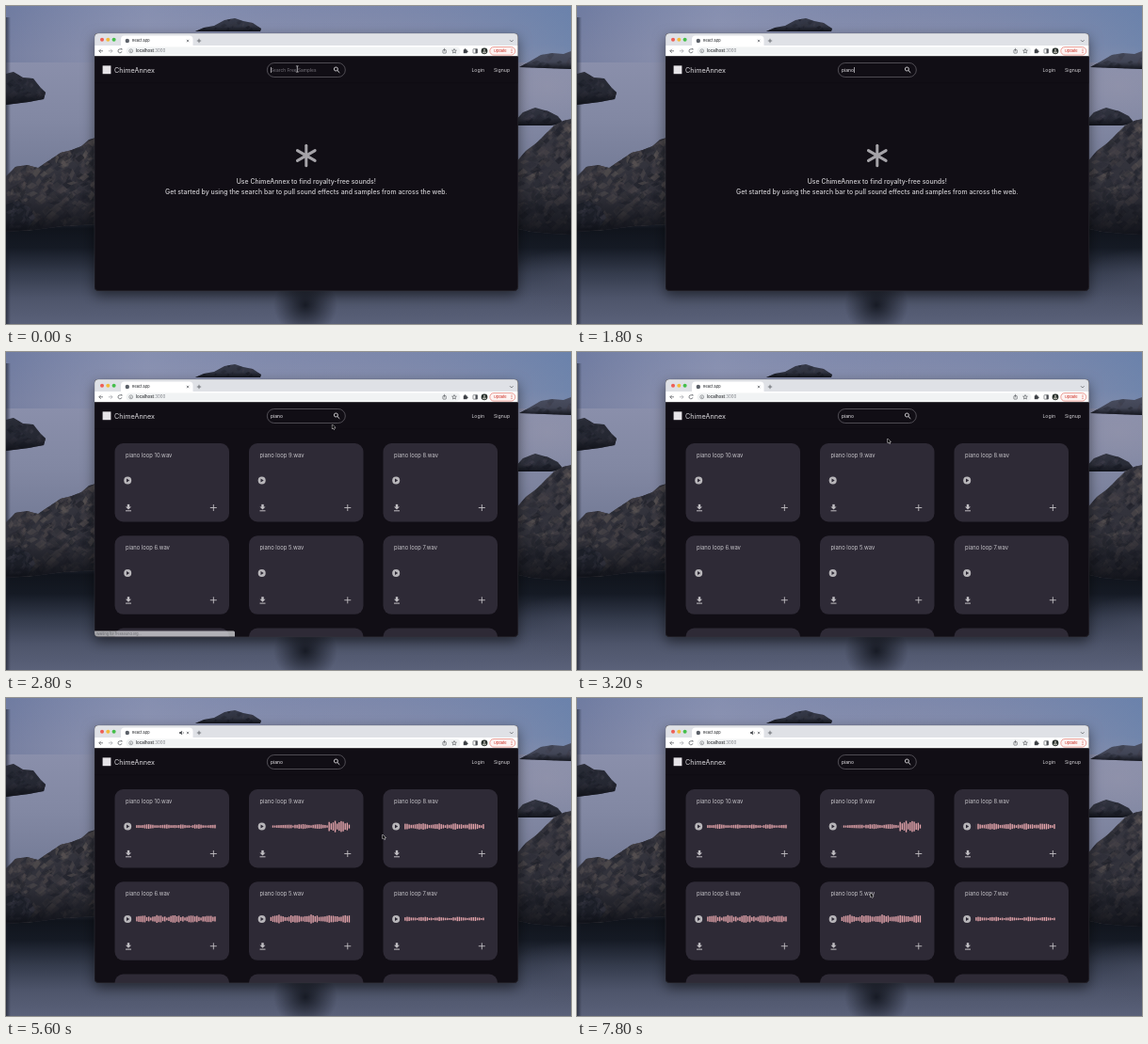
An HTML page with a canvas that plays this animation: 600 px wide and 338 px high, repeating every 8 s.

```html
<!DOCTYPE html>
<html lang="en">
<head>
<meta charset="utf-8">
<title>Sample search</title>
<style>
  html, body { margin: 0; width: 100%; height: 100%; overflow: hidden; background: #4a5263; }
  canvas { display: block; width: 100vw; height: 100vh; }
</style>
</head>
<body>
<canvas id="stage"></canvas>
<script>
const W = 600, H = 338, LOOP = 8000, STEP = 200;
const FONT = 'Inter, "Open Sans", sans-serif';
const canvas = document.getElementById('stage');
const scale = Math.max(1, window.devicePixelRatio || 1);
canvas.width = W * scale;
canvas.height = H * scale;
let ctx = canvas.getContext('2d');

function seeded(seed) {
  let s = seed;
  return () => (s = (s * 16807) % 2147483647) / 2147483647;
}

function text(str, x, y, size, color, weight = 400, align = 'left') {
  ctx.font = `${weight} ${size}px ${FONT}`;
  ctx.textAlign = align;
  ctx.fillStyle = color;
  ctx.fillText(str, x, y);
}

function rect(x, y, w, h, color) {
  ctx.fillStyle = color;
  ctx.fillRect(x, y, w, h);
}

function roundPath(x, y, w, h, r) {
  ctx.beginPath();
  ctx.roundRect(x, y, w, h, r);
}

function pill(x, y, w, h, r, fill, stroke, lw = 0.7) {
  roundPath(x, y, w, h, r);
  if (fill) { ctx.fillStyle = fill; ctx.fill(); }
  if (stroke) { ctx.strokeStyle = stroke; ctx.lineWidth = lw; ctx.stroke(); }
}

function dot(x, y, r, color) {
  ctx.beginPath();
  ctx.arc(x, y, r, 0, Math.PI * 2);
  ctx.fillStyle = color;
  ctx.fill();
}

function ring(x, y, r, color, lw, from = 0, to = Math.PI * 2) {
  ctx.beginPath();
  ctx.arc(x, y, r, from, to);
  ctx.strokeStyle = color;
  ctx.lineWidth = lw;
  ctx.stroke();
}

// Points are a flat list: x0, y0, x1, y1, ...
function trace(pts, close) {
  ctx.beginPath();
  for (let i = 0; i < pts.length; i += 2) ctx.lineTo(pts[i], pts[i + 1]);
  if (close) ctx.closePath();
}

function line(pts, color, lw) {
  trace(pts);
  ctx.strokeStyle = color;
  ctx.lineWidth = lw;
  ctx.stroke();
}

function shape(pts, color) {
  trace(pts, true);
  ctx.fillStyle = color;
  ctx.fill();
}

function gradient(x0, y0, x1, y1, stops) {
  const g = ctx.createLinearGradient(x0, y0, x1, y1);
  for (const [at, color] of stops) g.addColorStop(at, color);
  return g;
}

// ---- Wallpaper ----
function rock(pts, base, tones, count, seed, size) {
  const rnd = seeded(seed);
  const xs = pts.filter((_, i) => i % 2 === 0), ys = pts.filter((_, i) => i % 2);
  const left = Math.min(...xs), top = Math.min(...ys);
  const w = Math.max(...xs) - left, h = Math.max(...ys) - top;
  ctx.save();
  shape(pts, base);
  ctx.clip();
  for (let i = 0; i < count; i++) {
    const x = left + rnd() * w, y = top + rnd() * h;
    const a = size * (0.4 + rnd()), b = size * (0.2 + rnd() * 0.5);
    ctx.globalAlpha = 0.2 + rnd() * 0.4;
    shape([x, y, x + a * 0.6, y - b, x + a, y - b * 0.3, x + a * 0.4, y + b * 0.8],
      tones[Math.floor(rnd() * tones.length)]);
  }
  ctx.globalAlpha = 1;
  rect(left, top, w, h, gradient(0, top, 0, top + h,
    [[0, 'rgba(14,16,23,0)'], [0.6, 'rgba(14,16,23,.15)'], [1, 'rgba(14,16,23,.9)']]));
  ctx.restore();
}

function mist(x, y, rx, ry, color, alpha = 0.5) {
  ctx.save();
  ctx.translate(x, y);
  ctx.scale(rx, ry);
  const g = ctx.createRadialGradient(0, 0, 0, 0, 0, 1);
  g.addColorStop(0, `rgba(${color},${alpha})`);
  g.addColorStop(1, `rgba(${color},0)`);
  ctx.fillStyle = g;
  ctx.fillRect(-1, -1, 2, 2);
  ctx.restore();
}

function wallpaper() {
  rect(0, 0, W, H, gradient(0, 0, 0, H, [
    [0, '#7d88ab'], [0.15, '#8b90ac'], [0.36, '#8288a3'], [0.52, '#757c97'],
    [0.66, '#2b303d'], [0.7, '#10141c'], [0.76, '#151a24'], [0.84, '#343b4c'],
    [0.92, '#4e556b'], [1, '#5a6179']]));
  rect(0, 0, W, 60, gradient(0, 0, W, 0, [
    [0, 'rgba(94,108,148,.45)'], [0.25, 'rgba(150,156,186,.35)'],
    [0.6, 'rgba(125,135,172,.1)'], [1, 'rgba(88,124,172,.5)']]));
  mist(575, 85, 70, 45, '150,150,172');
  mist(600, 292, 70, 34, '78,84,106');
  mist(318, 318, 34, 32, '14,17,25', 0.85);
  rect(0, 12, 5, H - 12, gradient(0, 0, 5, 0, [[0, 'rgba(20,24,36,.6)'], [1, 'rgba(20,24,36,0)']]));

  const dark = ['#1b1e28', '#2a2c37', '#383843', '#454350'];
  const warm = ['#1d1f28', '#2f2f38', '#423f46', '#544e50', '#655d5b', '#262831'];
  rock([201, 27, 210, 23, 221, 21, 232, 15, 243, 13, 252, 16, 262, 18, 271, 24, 270, 27], '#363a49', dark, 40, 17, 6);
  rock([545, 65, 556, 59, 568, 52, 580, 50, 592, 51, 600, 48, 600, 67], '#4a4e60', dark, 30, 29, 7);
  rock([0, 72, 8, 70, 18, 76, 29, 77, 36, 86, 42, 92, 40, 99, 24, 102, 0, 105], '#292c37', dark, 80, 43, 8);
  rock([540, 123, 549, 113, 562, 108, 576, 112, 586, 117, 592, 125, 578, 127, 540, 127], '#30333f', dark, 50, 71, 8);
  rock([0, 181, 10, 171, 22, 169, 34, 172, 46, 164, 58, 156, 70, 153, 80, 149, 88, 142, 96, 140,
    96, 232, 60, 234, 30, 238, 0, 240], '#36363f', warm, 520, 97, 10);
  rock([540, 168, 552, 154, 564, 145, 573, 136, 582, 127, 592, 122, 600, 120, 600, 243,
    580, 242, 558, 240, 540, 236], '#373740', warm, 380, 131, 10);
  rock([0, 211, 12, 207, 25, 214, 31, 225, 22, 238, 0, 238], '#1d2029', dark, 60, 151, 8);
}

// ---- Browser window ----
function chrome(audible) {
  rect(94, 29, 450, 13, '#dfe1e6');
  dot(102, 35.8, 2, '#ee5f56');
  dot(108.3, 35.8, 2, '#f2bc3c');
  dot(114.6, 35.8, 2, '#45bf4b');
  pill(122, 31.5, 76.5, 13, [4, 4, 0, 0], '#fff');
  dot(128.8, 37, 2.2, '#5b6068');
  text('React App', 134, 38.4, 3.8, '#34363a', 500);
  line([191.8, 35.8, 194.2, 38.2], '#44474c', 0.6);
  line([194.2, 35.8, 191.8, 38.2], '#44474c', 0.6);
  line([202.8, 37, 207.2, 37], '#4b4e54', 0.7);
  line([205, 34.8, 205, 39.2], '#4b4e54', 0.7);
  line([535, 36.2, 536.8, 38, 538.6, 36.2], '#55585e', 0.7);
  if (audible) {
    shape([184, 36.2, 185.2, 36.2, 186.8, 34.8, 186.8, 39.2, 185.2, 37.8, 184, 37.8], '#3c3f44');
    ring(186.8, 37, 1.6, '#3c3f44', 0.5, -0.9, 0.9);
  }

  rect(94, 42, 450, 12, '#fff');
  const ink = '#4c4f55';
  line([103, 47.8, 98.8, 47.8], ink, 0.7);
  line([100.8, 45.8, 98.8, 47.8, 100.8, 49.8], ink, 0.7);
  line([108.8, 47.8, 113, 47.8], '#a0a3a8', 0.7);
  line([111, 45.8, 113, 47.8, 111, 49.8], '#a0a3a8', 0.7);
  ring(121, 47.8, 2, ink, 0.7, 0.2, 5.3);
  shape([121.5, 45.2, 123.3, 45.2, 123.3, 47.1], ink);
  pill(127.5, 43.4, 355, 9, 4.5, '#f1f3f4');
  ring(132.7, 47.8, 1.9, '#676a70', 0.6);
  line([132.7, 47.3, 132.7, 49], '#676a70', 0.6);
  text('localhost', 138, 49.4, 4.4, '#26282c', 500);
  const w = ctx.measureText('localhost').width;
  text(':3000', 138 + w, 49.4, 4.4, '#777a80');

  pill(463.9, 46.6, 3.4, 3.5, 0.5, null, ink, 0.6);
  line([465.6, 48.4, 465.6, 44.8], ink, 0.6);
  const star = [];
  for (let i = 0; i < 10; i++) {
    const r = i % 2 ? 1.1 : 2.5, a = i * Math.PI / 5 - Math.PI / 2;
    star.push(476 + r * Math.cos(a), 48 + r * Math.sin(a));
  }
  trace(star, true);
  ctx.strokeStyle = ink;
  ctx.lineWidth = 0.6;
  ctx.stroke();
  rect(485.8, 46.4, 3.8, 3.8, '#3d4045');
  dot(487.6, 46.2, 0.9, '#3d4045');
  dot(489.8, 48.3, 0.9, '#3d4045');
  pill(496, 45.7, 4.6, 4.4, 0.5, null, ink, 0.6);
  rect(498.5, 45.7, 2.1, 4.4, ink);
  dot(508, 47.8, 3.4, '#28302c');
  dot(508, 46.8, 1.1, '#a6a7a0');
  pill(506, 48.2, 4, 2, [1.8, 1.8, 0.8, 0.8], '#a6a7a0');
  pill(513.8, 43.6, 27, 8.5, 4.2, '#fdf3f2', '#dd655c', 0.6);
  text('Update', 518, 49.2, 3.9, '#cf3d33', 500);
  for (const y of [46, 47.8, 49.6]) dot(537, y, 0.5, '#cf3d33');
}

function header(typed, caret) {
  rect(94, 53.2, 450, 28.8, '#110e15');
  rect(94, 81.6, 450, 0.6, '#0d0b11');
  rect(102.6, 63.4, 8.8, 8.8, '#e6e4e8');
  text('ChimeAnnex', 115, 70.5, 7.2, '#dddbdf');
  pill(277.3, 60.5, 83, 15, 7.5, null, '#69666e', 0.7);
  if (typed) text(typed, 281, 69.8, 5, '#eceaee');
  else text('Search Free Samples', 281, 69.8, 4.85, '#77747c');
  if (caret) {
    const x = typed ? 281.3 + ctx.measureText(typed).width : 281;
    rect(x, 65, 0.6, 6, '#f2f0f4');
  }
  ring(350.4, 67, 2, '#d8d6da', 0.9);
  line([351.9, 68.5, 354.3, 70.9], '#d8d6da', 1);
  text('Login', 494.4, 69.8, 5.2, '#d4d2d6');
  text('Signup', 518, 69.8, 5.2, '#d4d2d6');
}

function welcome() {
  ctx.lineCap = 'round';
  for (let i = 0; i < 3; i++) {
    const a = Math.PI / 2 + i * Math.PI / 3, dx = 10.8 * Math.cos(a), dy = 10.8 * Math.sin(a);
    line([318.8 - dx, 159 - dy, 318.8 + dx, 159 + dy], '#a5a3a8', 3);
  }
  ctx.lineCap = 'butt';
  text('Use ChimeAnnex to find royalty-free sounds!', 318.8, 188.6, 6.9, '#cfcdd1', 500, 'center');
  text('Get started by using the search bar to pull sound effects and samples from across the web.',
    318.8, 200.2, 6.9, '#cfcdd1', 500, 'center');
}

// ---- Sample cards ----
const cards = [
  { loop: 10, amp: 2.1 }, { loop: 9, amp: 2.5, burst: true }, { loop: 8, amp: 3 },
  { loop: 6, amp: 3.7 }, { loop: 5, amp: 4.2 }, { loop: 7, amp: 2 },
  { loop: 4, amp: 3 }, { loop: 3, amp: 3 }, { loop: 2, amp: 3 }
];

function wave(x, y, { loop, amp, burst }, played) {
  const rnd = seeded(loop * 7919 + 11);
  for (let i = 0; i < 40; i++) {
    let h = amp * (0.6 + 0.22 * Math.sin(i * 0.75 + loop) + rnd() * 0.35);
    if (burst) h = i > 28 && i < 39 ? 2.5 + rnd() * 4.8 : Math.min(h, 1.1 + i * 0.09);
    rect(x + i * 2.13, y - h, 1.4, h * 2, i < played ? '#3d3642' : '#e2a3aa');
  }
}

function card(i, waves, played, playing) {
  const x = 115.5 + (i % 3) * 142.5, y = 97 + Math.floor(i / 3) * 98.3;
  pill(x, y, 121.5, 83.5, 9, '#2e2a36');
  text(`piano loop ${cards[i].loop}.wav`, x + 11.5, y + 15, 5.85, '#c6c4c9');
  const cx = x + 13.7, cy = y + 39.6;
  dot(cx, cy, 4, '#b8b6ba');
  if (playing) {
    rect(cx - 1.6, cy - 1.8, 1.1, 3.6, '#2e2a36');
    rect(cx + 0.5, cy - 1.8, 1.1, 3.6, '#2e2a36');
  } else shape([cx - 1.2, cy - 2, cx + 2, cy, cx - 1.2, cy + 2], '#2e2a36');
  if (waves) wave(x + 22.7, cy, cards[i], played);

  const dx = x + 14.5, dy = y + 68.5, icon = '#c0bec2';
  rect(dx - 1.2, dy - 3.6, 2.4, 3.2, icon);
  shape([dx - 3, dy - 1, dx + 3, dy - 1, dx, dy + 2], icon);
  rect(dx - 3, dy + 2.8, 6, 1, icon);
  rect(x + 101.3, dy - 0.5, 7, 0.9, icon);
  rect(x + 104.35, dy - 3.5, 0.9, 7, icon);
}

function status(alpha) {
  ctx.globalAlpha = alpha;
  pill(94, 296.5, 149, 6.2, [0, 1.5, 0, 0], '#dcdce0');
  text('Waiting for freesound.org...', 96, 301, 3.7, '#4b4d52');
  ctx.globalAlpha = 1;
}

// ---- Pointer ----
function outlined(pts, fill, edge) {
  trace(pts, true);
  ctx.strokeStyle = edge;
  ctx.lineWidth = 1;
  ctx.stroke();
  ctx.fillStyle = fill;
  ctx.fill();
}

const pointers = {
  beam(x, y) {
    line([x, y - 3, x, y + 3], '#d9d7db', 0.8);
    line([x - 1.4, y - 3.2, x + 1.4, y - 3.2], '#d9d7db', 0.6);
    line([x - 1.4, y + 3.2, x + 1.4, y + 3.2], '#d9d7db', 0.6);
  },
  arrow(x, y) {
    outlined([x, y, x, y + 4.6, x + 1.1, y + 3.7, x + 1.9, y + 5.3, x + 2.6, y + 5,
      x + 1.9, y + 3.4, x + 3.3, y + 3.3], '#111', '#d8d6da');
  },
  hand(x, y) {
    outlined([x, y, x + 0.9, y, x + 1, y + 2, x + 3.4, y + 2.6, x + 3.2, y + 4.6, x + 2.6, y + 5.6,
      x + 0.4, y + 5.6, x - 1.4, y + 3.4, x - 0.8, y + 2.9, x, y + 3.5], '#fff', '#222');
  }
};

// time, x, y
const path = [
  [2800, 346.4, 77], [3200, 330, 92], [4000, 273, 137.5], [4200, 273.3, 137.5], [5000, 274, 138],
  [5600, 400, 145.2], [6000, 414, 137.5], [7000, 414.5, 138], [7800, 311.6, 207]
];

function pointer(t) {
  if (t < 600) return pointers.beam(309.3, 67);
  if (t < path[0][0]) return;
  let i = 0;
  while (i < path.length - 2 && t > path[i + 1][0]) i++;
  const [t0, x0, y0] = path[i], [t1, x1, y1] = path[i + 1];
  const k = Math.min(1, (t - t0) / (t1 - t0)), e = k * k * (3 - 2 * k);
  const press = (t >= 4000 && t <= 5000) || (t >= 6000 && t <= 7000);
  pointers[press ? 'hand' : 'arrow'](x0 + (x1 - x0) * e, y0 + (y1 - y0) * e);
}

// ---- Scene ----
const backdrop = document.createElement('canvas');
backdrop.width = canvas.width;
backdrop.height = canvas.height;

function paintBackdrop() {
  const main = ctx;
  ctx = backdrop.getContext('2d');
  ctx.scale(scale, scale);
  wallpaper();
  ctx.shadowColor = 'rgba(0,0,0,.5)';
  ctx.shadowBlur = 14 * scale;
  ctx.shadowOffsetY = 5 * scale;
  pill(94, 29, 449.7, 273.7, 4, '#110e15');
  ctx = main;
}

function draw(t) {
  ctx.setTransform(scale, 0, 0, scale, 0, 0);
  ctx.drawImage(backdrop, 0, 0, W, H);
  const found = t >= 2800;
  const typed = 'piano'.slice(0, Math.max(0, Math.min(5, (t - 600) / 200)));
  ctx.save();
  roundPath(94, 29, 449.7, 273.7, 4);
  ctx.clip();
  rect(94, 29, 450, 274, '#110e15');
  chrome(t >= 4400);
  header(typed, !found);
  if (found) {
    const playing = [0, t >= 4200 && t < 5200, t >= 6200 && t < 7000];
    const played = [0, t >= 4600 ? 1 : 0, t >= 6600 ? 1 : 0];
    cards.forEach((_, i) => card(i, t >= 3400, played[i] || 0, playing[i]));
  } else welcome();
  if (t >= 2000 && t < 3000) status(found ? 0.75 : 1);
  ctx.restore();
  pill(94, 29, 449.7, 273.7, 4, null, 'rgba(90,88,98,.5)', 0.5);
  pointer(t);
}

paintBackdrop();
const start = performance.now();
let last = -1;
function tick() {
  const t = Math.floor((performance.now() - start) % LOOP / STEP) * STEP;
  if (t !== last) draw(last = t);
  requestAnimationFrame(tick);
}
draw(0);
requestAnimationFrame(tick);
</script>
</body>
</html>
```
